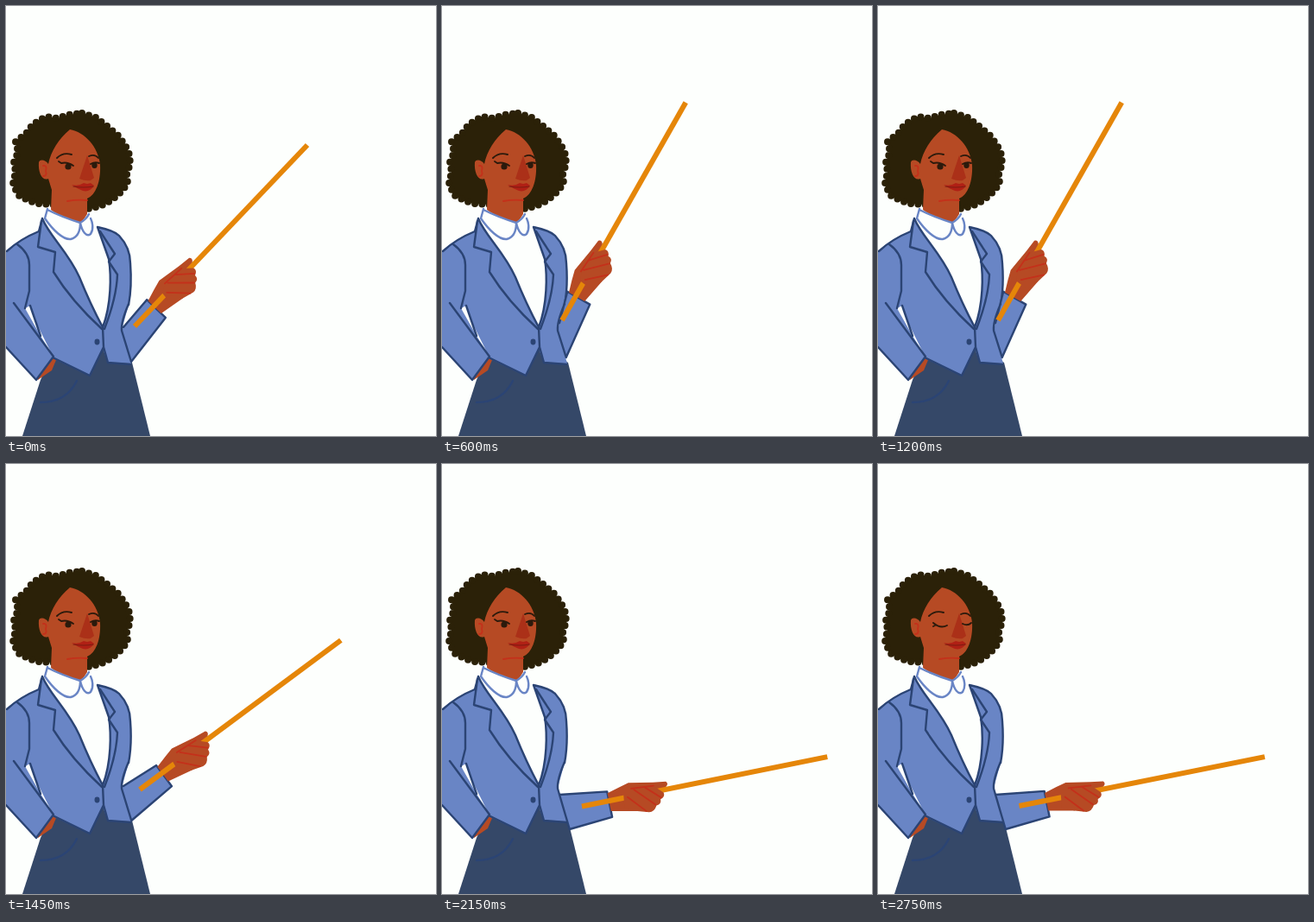
Recreate the animation shown at these times as an HTML page. Size 498x498 px, loop 2.8 s.

```html
<!DOCTYPE html>
<html lang="en">
<head>
<meta charset="utf-8">
<title>Teacher with pointer</title>
<style>
  html, body { margin: 0; width: 100%; height: 100%; overflow: hidden; background: #fdfffd; }
  svg { display: block; width: 498px; height: 498px; }
  path { stroke-linecap: round; stroke-linejoin: round; }
  .hair { fill: #2b2108; }
  .skin { fill: #b64a24; }
  .cloth { fill: #6985c5; }
  .shirt { fill: #fdfffd; }
  .seam { fill: none; stroke: #2b4474; stroke-width: 2.4; }
  .trim { fill: none; stroke: #6985c5; stroke-width: 2.4; }
  .red { fill: none; stroke: #c4301a; stroke-width: 1.8; }
  .ink { fill: none; stroke: #2b1a0c; stroke-width: 1.9; }
</style>
</head>
<body>
<svg viewBox="0 0 498 498">
  <!-- hair and head -->
  <path class="hair" d="M88 124 L104 129 L117 139 L130 150 L138 161 L143 172 L144 183 L140 194 L141 206 L130 219 L116 229 L98 235 L54 230 L38 229 L27 226 L14 219 L8 206 L11 192 L9 181 L14 169 L11 157 L23 148 L31 137 L46 128 L60 130 L72 126 Z"
    stroke="#2b2108" stroke-width="8" stroke-dasharray="0 8.3"/>
  <path class="skin" d="M74 143 C91 146 107 163 109 184 C110 203 104 219 94 223 L94 241 L87 252 C73 247 60 242 52 236 L53 213 L49 200 C42 203 37 193 38 181 C39 177 46 178 49 183 C52 168 61 154 74 143 Z"/>
  <path class="red" d="M71 226 Q82 224 94 225 M43 185 Q48 184 46 191 Q48 197 43 197"/>
  <path d="M94 173 L85 200 Q92 203 98 202 L102 199 Z" fill="#ab3018"/>
  <path d="M76 207 Q84 209 90 205 L94 206 L98 205 L102 208 Q97 216 89 214 Q83 212 76 207 Z" fill="#b02015"/>
  <path d="M78 209 Q90 211 101 209" fill="none" stroke="#7c1c12" stroke-width="1.2"/>
  <path class="ink" d="M59 176 Q66 169 76 172 M96 174 Q103 171 107 176"/>
  <g id="open">
    <path class="ink" d="M64 182 Q71 180 78 185 M98 183 Q103 180 108 182 M64 182 L61 180"/>
    <ellipse cx="72" cy="186" rx="3.6" ry="3.6" fill="#2b1a0c"/>
    <ellipse cx="102.5" cy="184.5" rx="3.2" ry="3.6" fill="#2b1a0c"/>
  </g>
  <path id="shut" class="ink" d="M64 184 Q72 191 80 187 M66 187 L64 188 M98 185 Q104 188 108 184"/>

  <!-- skirt and pocket hand -->
  <path d="M54 404 L40 433 L19 498 H167 L146 413 L112 390 Z" fill="#354868"/>
  <path class="seam" d="M40 459 Q70 459 82 434"/>
  <path class="skin" d="M51 405 L58 410 L53 422 L37 433 L34 428 Z"/>

  <!-- blouse -->
  <path class="shirt" d="M48 236 Q66 245 86 251 L96 241 L107 258 L121 296 L118 350 L112 373 L60 290 L43 247 Z"/>
  <path class="trim" d="M48 235 L45 246 C54 259 66 271 75 270 C83 268 86 261 86 251 C88 261 93 268 98 264 C102 258 100 250 98 246 M48 236 Q66 245 86 251 Q93 247 96 241"/>

  <!-- jacket -->
  <path class="cloth" d="M42 246 C50 266 72 285 85 314 Q98 346 112 372 C122 346 122 312 119 293 L106 256 Q125 260 131 266 Q144 280 144 298 Q146 325 142 346 L134 375 L145 414 L118 413 L112 397 L97 428 L56 409 L34 365 L28 347 L22 350 L40 382 L55 406 L35 433 L0 395 V284 Q14 270 38 261 Z"/>
  <path class="seam" d="M38 261 L42 246 C50 266 72 285 85 314 Q98 346 112 372 C122 346 122 312 119 293 L106 256 Q125 260 131 266 Q144 280 144 298 Q146 325 142 346"/>
  <path class="seam" d="M41 249 L37 279 L57 285 L55 308 Q76 342 111 374 M109 261 L126 287 L119 296 L129 311 Q128 338 114 374"/>
  <path class="seam" d="M112 372 L113 395 L97 428 L56 408 M113 395 L118 413 L144 415 M38 261 Q16 270 1 284 M13 276 Q27 286 27 300 V330 L22 350 M28 347 L40 382 M9 344 L55 406 L35 433 L0 395"/>
  <ellipse cx="105.500" cy="389" rx="3" ry="3.400" fill="#2b4474"/>

  <!-- pointing arm -->
  <path id="sleeve" class="cloth"/>
  <path id="edge" class="seam"/>
  <g id="hand">
    <path class="skin" d="M32 -9 L46 -13 L58 -16 L86 -11 L101 -9 Q104 -6 100 -3 L92 2 L62 18 L32 12 Z"/>
    <path d="M0 0 H290" fill="none" stroke="#e58609" stroke-width="6" style="stroke-linecap:butt"/>
    <path class="skin" d="M50 -4 L62 -9 L86 -7 L96 3 Q97 8 91 10 Q91 16 85 16 Q81 23 75 22 L62 18 L48 12 Z"/>
    <path class="red" d="M54 0 L72 20 M63 -7 L84 15 M76 -7 L92 8 M60 -9 L86 -7"/>
  </g>
</svg>
<script>
  const LOOP = 2800, STEP = 50;
  const $ = id => document.getElementById(id);

  // time, pointer end x, y, angle, elbow drop
  const A = [149, 371, -46.4, 0], B = [139, 364, -60.4, -5],
        C = [155, 377, -36.6, 1], D = [163.500, 396, -11.3, 11];
  const keys = [
    [0, ...A], [450, ...A], [550, ...B], [1200, ...B], [1300, ...C],
    [2050, ...C], [2150, 162, 396.500, -11.4, 11], [2200, ...D], [LOOP, ...D]
  ];

  function poseAt(t) {
    const i = keys.findIndex(k => k[0] > t), a = keys[i - 1], b = keys[i];
    const p = (t - a[0]) / (b[0] - a[0]);
    return a.slice(1).map((v, n) => v + (b[n + 1] - v) * p);
  }

  function draw(now) {
    const t = Math.floor(now % LOOP / STEP) * STEP;
    const [x, y, deg, drop] = poseAt(t);
    const r = deg * Math.PI / 180, c = Math.cos(r), s = Math.sin(r);
    const at = (u, v) => `${(x + u * c - v * s).toFixed(1)} ${(y + u * s + v * c).toFixed(1)}`;
    const top = at(32, -11), low = at(32, 19);
    const inner = `136 ${372 + drop}`, outer = `${145 + drop / 4} ${412 + drop}`;

    $('hand').setAttribute('transform', `translate(${x} ${y}) rotate(${deg})`);
    $('sleeve').setAttribute('d', `M${inner} L${top} L${low} L${outer} L134 376 Z`);
    $('edge').setAttribute('d', `M142 345 Q133 366 134 376 L${outer} L${low} L${top} L${inner}`);

    const blink = t >= 2700;
    $('open').style.display = blink ? 'none' : '';
    $('shut').style.display = blink ? '' : 'none';
  }

  const start = performance.now();
  function tick() {
    draw(performance.now() - start);
    requestAnimationFrame(tick);
  }
  tick();
</script>
</body>
</html>
```
